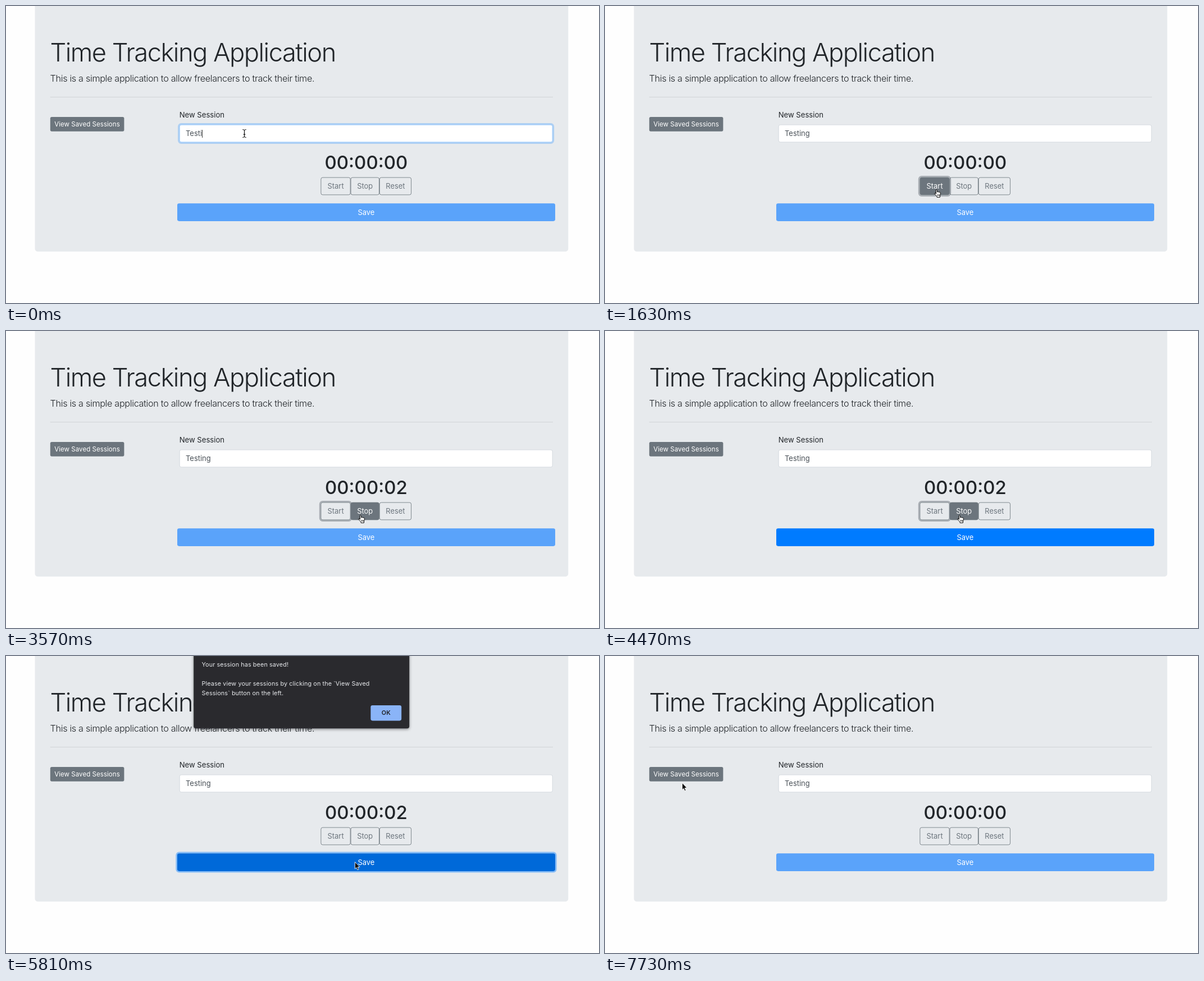
Animation of 1056 by 530 pixels, one loop 8 s. Source, as an HTML page:

```html
<!DOCTYPE html>
<html lang="en">
<head>
<meta charset="utf-8">
<title>Time Tracking Application</title>
<style>
html, body { margin: 0; width: 100%; height: 100%; overflow: hidden; background: #fefefe; }
svg { display: block; }
text { font: 400 12.95px Inter, "Open Sans", sans-serif; font-optical-sizing: none; fill: #212529; white-space: pre; }
.mid { text-anchor: middle; }
.title { font-size: 45.3px; font-weight: 300; letter-spacing: -.0335em; }
.lead { font-size: 16.2px; font-weight: 300; letter-spacing: -.02em; }
.label { font-size: 13.1px; }
.small { font-size: 11.5px; letter-spacing: .005em; fill: #fff; }
.typed { fill: #495057; }
.clock { font-size: 33px; font-weight: 500; }
.alert text { font-size: 10.8px; letter-spacing: .01em; fill: #e8eaed; }
.alert .ok { font-size: 10.8px; font-weight: 600; }
.edge { stroke-width: .84; }
.ring { fill: none; stroke-width: 2.67; }
</style>
</head>
<body>
<svg width="1056" height="530" viewBox="0 0 1056 530">
  <defs>
    <filter id="shadow" x="-10%" y="-10%" width="120%" height="130%">
      <feDropShadow dx="0" dy="1.5" stdDeviation="2.5" flood-opacity=".45"/>
    </filter>
  </defs>
  <rect x="51.5" y="-10" width="949.7" height="448.3" rx="5" fill="#e7eaed"/>
  <text class="title" x="78.5" y="99.3">Time Tracking Application</text>
  <text class="lead" x="78.5" y="135.2">This is a simple application to allow freelancers to track their time.</text>
  <path d="M78.7 162.6H974" stroke="#000" stroke-opacity=".1"/>
  <rect x="78.8" y="197.9" width="131.6" height="25.9" rx="2.7" fill="#6c757d"/>
  <text class="small mid" x="144.5" y="215.3">View Saved Sessions</text>
  <text class="label" x="308.7" y="199.3">New Session</text>

  <rect class="ring" id="inputRing" x="307.4" y="210.3" width="667.4" height="34.4" rx="4.6" stroke="#007bff" stroke-opacity=".25"/>
  <rect class="edge" id="input" x="309.2" y="212.1" width="663.9" height="30.8" rx="3" fill="#fff"/>
  <text class="typed" id="typed" x="320" y="232.4"></text>
  <path id="caret" stroke="#222" stroke-width=".9"/>

  <text class="clock mid" id="clock" x="641.4" y="291"></text>
  <g id="buttons"></g>

  <rect class="ring" id="saveRing" x="303.7" y="350.9" width="675.6" height="34.3" rx="4.6" stroke="#268fff" stroke-opacity=".5"/>
  <rect id="save" x="305" y="352.2" width="673" height="31.7" rx="3.3"/>
  <text class="mid" x="641.4" y="372.5" style="fill:#fff">Save</text>

  <g class="alert" id="alert">
    <rect x="334.2" y="-20" width="384" height="149.3" rx="4" fill="#292a2d" filter="url(#shadow)"/>
    <text x="348.5" y="18.6">Your session has been saved!</text>
    <text x="348.5" y="52.6">Please view your sessions by clicking on the `View Saved</text>
    <text x="348.5" y="70">Sessions` button on the left.</text>
    <rect id="okBox" x="649.4" y="88" width="54.8" height="27.4" rx="3.3"/>
    <text class="ok mid" id="okText" x="676.8" y="105.4">OK</text>
  </g>

  <path id="beam" d="M-3.3 -7Q-.5 -7 0 -5.6Q.5 -7 3.3 -7M0 -5.8V5.8M-3.3 7Q-.5 7 0 5.6Q.5 7 3.3 7M-1.8 1.6H1.8" fill="none" stroke="#111" stroke-width="1.2"/>
  <path id="arrow" d="M.4 .6V12.9L3.1 10.4L5 14.7L7 13.8L5.2 9.6H9Z" fill="#000" stroke="#fff" stroke-width=".9" stroke-linejoin="round"/>
  <g id="hand" stroke="#000" stroke-linejoin="round">
    <path d="M3.6 8.2L3.1 1.8Q3.2 .6 4.2 .6Q5.2 .6 5.3 1.8L5.6 5Q6.4 4 7.6 5Q8.7 4.3 9.6 5.4Q11.2 5.1 11.4 6.6Q11.6 9 10.6 11.2L10.4 14.3H5.2L4.9 12.6Q3 10.5 .9 8.2Q.4 6.8 1.8 6.9Q2.6 7 3.6 8.2Z" fill="#fff"/>
    <path d="M6 9V12M7.7 9V12M9.4 9V12" stroke-width=".7"/>
  </g>
</svg>
<script>
const $ = id => document.getElementById(id);
const set = (el, attrs) => { for (const k in attrs) el.setAttribute(k, attrs[k]); };
const show = (el, on) => set(el, { opacity: +on });
const GREY = '#6c757d';

// start time, pointer shape, x, y
const moves = [
  [0, 'beam', 424.5, 227.5], [440, 'beam', 437, 233], [590, 'arrow', 505, 262],
  [740, 'arrow', 590, 290], [880, 'hand', 640, 324], [1030, 'hand', 612, 326],
  [1180, 'hand', 586, 327], [2080, 'hand', 600, 328], [2230, 'hand', 625, 330],
  [2380, 'hand', 641, 331], [2520, 'hand', 648, 331], [2970, 'hand', 638, 330],
  [3120, 'hand', 627, 328], [4760, 'arrow', 625, 345], [4910, 'hand', 618, 363],
  [5060, 'hand', 617, 367], [5810, 'arrow', 621, 367], [6100, 'arrow', 626, 330],
  [6250, 'arrow', 645, 230], [6400, 'arrow', 664, 125], [6540, 'arrow', 668, 101],
  [7130, 'arrow', 345, 180], [7280, 'arrow', 127, 255], [7580, 'arrow', 130, 243],
  [7730, 'arrow', 137, 226]
];

const buttons = [['Start', 560.5, 613.6], ['Stop', 613.6, 664.9], ['Reset', 664.9, 722]].map(([label, x, end]) => {
  const g = $('buttons');
  const add = (tag, attrs) => {
    const el = document.createElementNS('http://www.w3.org/2000/svg', tag);
    set(el, attrs);
    return g.appendChild(el);
  };
  const outline = (name, gap, rx) => add('rect', {
    class: name, x: x - gap, y: 305.67 - gap, width: end - x + 2 * gap, height: 31.67 + 2 * gap, rx, stroke: GREY
  });
  const ring = outline('ring', 1.33, 4.6);
  const box = outline('edge', -.42, 3);
  const text = add('text', { class: 'mid', x: (x + end) / 2, y: 326.4 });
  set(ring, { 'stroke-opacity': .5 });
  text.textContent = label;
  return (hover, focus) => {
    show(ring, focus);
    set(box, { fill: hover ? GREY : 'none' });
    text.style.fill = hover ? '#fff' : GREY;
  };
});

function draw(t) {
  const within = (a, b) => t >= a && t < b;

  $('typed').textContent = t < 150 ? 'Testi' : 'Testing';
  set($('caret'), { d: `M${t < 150 ? 349.6 : 364.8} 221V235` });
  show($('caret'), t < 740 || within(1180, 1480));
  set($('inputRing'), { opacity: t < 1480 ? 1 : t < 1630 ? .5 : 0 });
  set($('input'), { stroke: t < 1480 ? '#80bdff' : '#ced4da' });

  const seconds = within(2520, 3570) ? 1 : within(3570, 6840) ? 2 : 0;
  $('clock').textContent = '00:00:0' + seconds;
  buttons[0](within(1180, 2230), within(1480, 1630) ? .5 : within(1630, 4620));
  buttons[1](within(880, 1180) || within(2230, 4760), within(4620, 5360));
  buttons[2](false, false);

  const enabled = within(4470, 6840);
  set($('save'), { fill: !enabled ? '#5aa3fa' : t < 4910 ? '#007bff' : '#0069d9' });
  show($('saveRing'), within(5360, 6840));

  const opening = within(5510, 5660), closing = within(6690, 6840);
  const pressed = within(6540, 6840);
  set($('alert'), {
    opacity: opening ? .6 : closing ? .895 : +within(5660, 6690),
    transform: opening || closing ? 'translate(1.6 -1.8) scale(.997 1)' : ''
  });
  set($('okBox'), { fill: pressed ? '#778fc7' : '#8ab4f8' });
  $('okText').style.fill = pressed ? '#414d69' : '#202124';

  const [, shape, x, y] = moves.findLast(m => m[0] <= t);
  for (const id of ['beam', 'arrow', 'hand']) show($(id), id === shape);
  set($(shape), { transform: `translate(${x} ${y})` });
}

const begin = performance.now();
function tick() {
  draw((performance.now() - begin) % 8000);
  requestAnimationFrame(tick);
}
tick();
</script>
</body>
</html>
```
